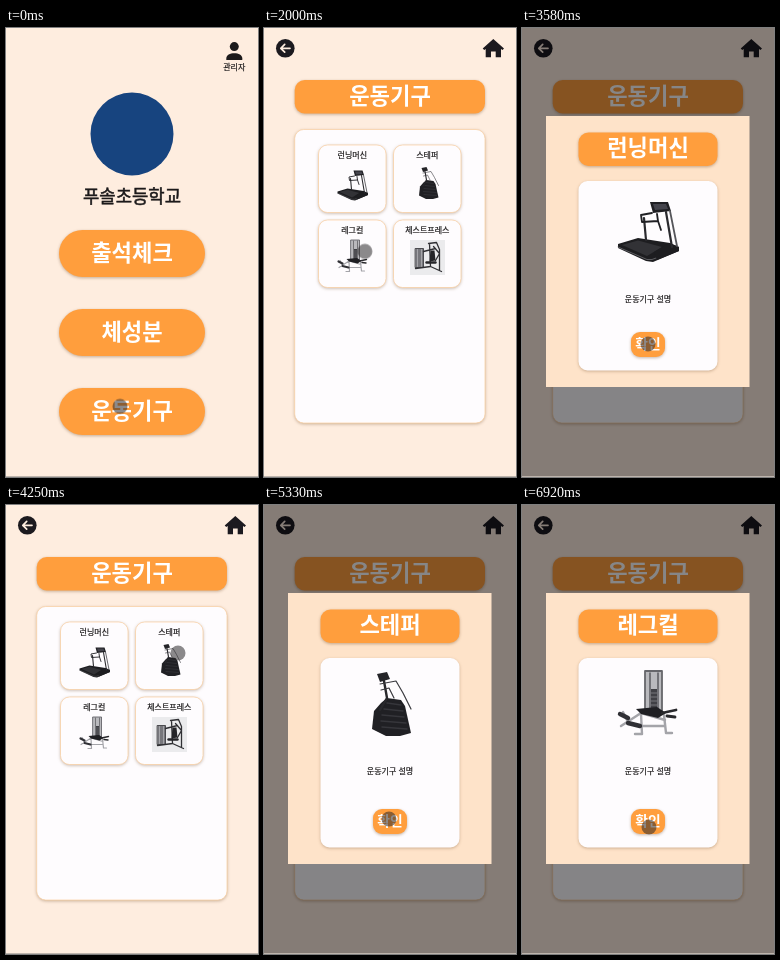
These frames come from a looping animation (252 px wide and 449 px high, 7.01 s). An HTML page:

```html
<!DOCTYPE html>
<html lang="ko">
<head>
<meta charset="utf-8">
<title>운동기구</title>
<style>
html, body { margin: 0; width: 100%; height: 100%; overflow: hidden; background: #feeddf; }
svg.stage { display: block; width: 100vw; height: 100vh; }
text { font-family: "Noto Sans CJK KR", "Noto Sans CJK", "Noto Sans CJK JP", sans-serif; text-anchor: middle; fill: #1c1a1b; }
.small { font-size: 8px; stroke: #1c1a1b; stroke-width: .2; }
.school { font-size: 17.8px; stroke: #1c1a1b; stroke-width: .5; }
.big { font-size: 22.2px; font-weight: 700; fill: #fff; }
.ok { font-size: 13.8px; font-weight: 700; fill: #fff; }
.btn { fill: #ff9e3d; filter: drop-shadow(0 1.5px 1.5px rgba(90, 50, 10, .35)); }
.card { fill: #fefcfe; stroke: #fbcf9f; stroke-width: .7; filter: drop-shadow(0 1.5px 1.5px rgba(90, 50, 10, .3)); }
.plain { stroke: none; }

.home, .list, .modal, .stepper, .curl, .tread { animation: 7010ms step-end infinite; }
.home { animation-name: home; }
.list { animation-name: list; }
.modal { animation-name: modal; }
.tread { animation-name: tread; }
.stepper { animation-name: stepper; }
.curl { animation-name: curl; }
@keyframes home { 0% { opacity: 1 } 11.8%, 100% { opacity: 0 } }
@keyframes list { 0% { opacity: 0 } 11.8%, 100% { opacity: 1 } }
@keyframes modal {
  0%, 52.3%, 77.3% { opacity: 0 }
  34.5%, 63%, 88%, 100% { opacity: 1 }
}
@keyframes tread { 0% { opacity: 1 } 60%, 100% { opacity: 0 } }
@keyframes stepper { 0%, 80%, 100% { opacity: 0 } 60% { opacity: 1 } }
@keyframes curl { 0% { opacity: 0 } 80%, 100% { opacity: 1 } }

.touch { fill: rgba(40, 38, 40, .54); animation: touch 7010ms ease-in-out infinite; }
@keyframes touch {
  0%, 22.5% { transform: translate(114px, 378.4px) }
  32.1%, 41.6% { transform: translate(95.6px, 161.3px) }
  51.1%, 52.3% { transform: translate(126px, 316px) }
  60.4%, 63.5% { transform: translate(172px, 148px) }
  72.5%, 77.3% { transform: translate(125px, 314px) }
  84.4%, 89% { transform: translate(102px, 229px) }
  97.2%, 100% { transform: translate(127px, 322px) }
}
</style>
</head>
<body>
<svg class="stage" viewBox="0 0 252 449" preserveAspectRatio="none">
  <defs>
    <!-- Machines are centred on 0,0 at dialog size -->
    <g id="treadmill" fill="none" stroke-linecap="round" stroke-linejoin="round">
      <path d="M-30 14L-10 8L22 13L31 17V21L5 32L-2 31L-30 18Z" fill="#1d1d20"/>
      <path d="M-26 15L-10 10.5L14 17L-1 26Z" fill="#323236"/>
      <path d="M-30 17L-1 29.5L4 29.5L30 20" stroke="#77777c" stroke-width=".7"/>
      <path d="M6 22L21 13L31 17V21L9 30Z" fill="#1d1d20"/>
      <path d="M-2 10L-4-12M24 17L18-18" stroke="#2a2a2e" stroke-width="2.2"/>
      <path d="M4-17L-7-15L-6-8L10-9L9-16M10-9L13 0" stroke="#202024" stroke-width="1.8"/>
      <path d="M2-28L20-28L23-19L5-17Z" fill="#1f1f23"/>
      <path d="M5-26L18-26L20-21L7-20Z" fill="#44444c"/>
      <path d="M22-19L29 16" stroke="#55555a" stroke-width="1.8"/>
    </g>
    <g id="climber" fill="none" stroke-linecap="round" stroke-linejoin="round">
      <path d="M-16 5L-9-3L-3-8L11-6L15 0L21 27L10 30L-4 30L-18 23Z" fill="#202024"/>
      <path d="M-3-3L11-1M-6 3L13 5M-8 9L14 11M-9 15L16 17M-8 21L17 23" stroke="#36363b" stroke-width="1.4"/>
      <path d="M-6-25L-3-8L-10 4" stroke="#28282c" stroke-width="2.4"/>
      <path d="M-13-32L-3-34L0-27L-10-24Z" fill="#242428"/>
      <path d="M-10-22L6-25L13-13L21 3M-9-16L-1-18L4-8" stroke="#3b3b40" stroke-width="1.2"/>
    </g>
    <g id="legcurl" fill="none" stroke-linecap="round" stroke-linejoin="round">
      <path d="M-3-34H14V6H-3Z" fill="#b9b9bd" stroke="#66666b" stroke-width="1.8"/>
      <path d="M2-32V4M10-32V4" stroke="#55555a" stroke-width="1.4"/>
      <path d="M3-16H9V5H3Z" fill="#404045"/>
      <path d="M3-12H9M3-8H9M3-4H9M3 0H9" stroke="#85858a" stroke-width=".8"/>
      <path d="M-27 21L-7 8L17 15M-7 9L-6 29H-13M16 10L18 28H24M-6 21H17M-25 7L-19 19" stroke="#a4a4a9" stroke-width="2.4"/>
      <path d="M-12 4L9 2L18 8L10 13L-7 9Z" fill="#1f1f23"/>
      <path d="M14 8L28 5M19 11L27 12" stroke="#28282c" stroke-width="2.8"/>
      <path d="M-28 9L-20 13M-20 18L-8 21" stroke="#303035" stroke-width="4.4"/>
    </g>
    <g id="press" fill="none" stroke-linecap="round" stroke-linejoin="round">
      <path d="M-17.5-17.5H17.5V17.5H-17.5Z" fill="#ebebed"/>
      <path d="M-12-9H-4V10H-12Z" fill="#77777c" stroke="#404045" stroke-width=".9"/>
      <path d="M-10-8V9M-6-8V9" stroke="#b0b0b4" stroke-width=".8"/>
      <path d="M1-14L9-15L12-8V13M2-14L3 9M-12 11L3 9L14 14M-4-6L8-9M6-11L12-4L8 3" stroke="#303034" stroke-width="1.3"/>
      <path d="M3-7H7L8 3L2 4Z" fill="#252529"/>
      <path d="M-1 5H8" stroke="#252529" stroke-width="2.4"/>
    </g>
    <rect id="tile" class="card" x="-34" y="-33.5" width="67.5" height="67.5" rx="9"/>
    <rect id="pill" class="btn" x="53" y="-23.5" width="146" height="47" rx="23.5"/>
  </defs>

  <rect width="252" height="449" fill="#feeddf"/>

  <g class="home">
    <circle cx="228.3" cy="18.6" r="4.5" fill="#1c1a1b"/>
    <path d="M220.3 32V30.5C220.3 27 224 25.2 228.3 25.2S236.3 27 236.3 30.5V32Z" fill="#1c1a1b"/>
    <text class="small" x="228.3" y="42">관리자</text>
    <circle cx="126" cy="106" r="41.5" fill="#17447f"/>
    <text class="school" x="126" y="174.5">푸솔초등학교</text>
    <use href="#pill" y="225.5"/><text class="big" x="126" y="232.5">출석체크</text>
    <use href="#pill" y="304.5"/><text class="big" x="126" y="311.5">체성분</text>
    <use href="#pill" y="383.5"/><text class="big" x="126" y="390.5">운동기구</text>
  </g>

  <g class="list">
    <rect class="btn" x="30.7" y="52" width="190.3" height="33.5" rx="10"/>
    <text class="big" x="126" y="75.7">운동기구</text>
    <rect class="card" x="30.7" y="101.5" width="190.3" height="293.5" rx="9"/>
    <use href="#tile" x="88.5" y="150.5"/>
    <use href="#tile" x="163.5" y="150.5"/>
    <use href="#tile" x="88.5" y="225.5"/>
    <use href="#tile" x="163.5" y="225.5"/>
    <text class="small" x="88.3" y="130">런닝머신</text>
    <text class="small" x="163.3" y="130">스테퍼</text>
    <text class="small" x="88.3" y="204.5">레그컬</text>
    <text class="small" x="163.3" y="204.5">체스트프레스</text>
    <use href="#treadmill" transform="translate(88.5 156.5) scale(.5)"/>
    <use href="#climber" transform="translate(164 156) scale(.5)"/>
    <use href="#legcurl" transform="translate(88.5 229) scale(.5)"/>
    <use href="#press" transform="translate(163.5 229.5)"/>
    <circle cx="21.3" cy="20.3" r="9.3" fill="#1c1a1f"/>
    <path d="M26 20.3H17M20.7 16.4L16.8 20.3L20.7 24.2" fill="none" stroke="#feeddf" stroke-width="1.7" stroke-linecap="round" stroke-linejoin="round"/>
    <path d="M229.3 11L240 20.5L238.5 22L237 21V29.3H231.7V23.5H227V29.3H221.7V21L220.2 22L218.7 20.5Z" fill="#1c1a1f"/>
  </g>

  <g class="modal">
    <rect width="252" height="449" fill="rgba(0,0,4,.475)"/>
    <rect x="24" y="88" width="203.5" height="271" fill="#fee3c9"/>
    <rect class="btn" x="56.5" y="104.5" width="139" height="33.5" rx="10"/>
    <rect class="card plain" x="56.5" y="153" width="139" height="189.5" rx="9"/>
    <rect class="btn" x="109" y="304" width="34" height="25" rx="9"/>
    <text class="ok" x="126" y="321">확인</text>
    <g class="tread">
      <text class="big" x="126" y="128.3">런닝머신</text>
      <use href="#treadmill" x="126" y="202"/>
      <text class="small" x="126" y="274">운동기구 설명</text>
    </g>
    <g class="stepper">
      <text class="big" x="126" y="128.3">스테퍼</text>
      <use href="#climber" x="126" y="201"/>
      <text class="small" x="126" y="269.3">운동기구 설명</text>
    </g>
    <g class="curl">
      <text class="big" x="126" y="128.3">레그컬</text>
      <use href="#legcurl" x="126" y="200"/>
      <text class="small" x="126" y="269.3">운동기구 설명</text>
    </g>
  </g>

  <rect y="448" width="252" height="1" fill="#bdb4ac"/>
  <circle class="touch" r="7.5"/>
</svg>
</body>
</html>
```
